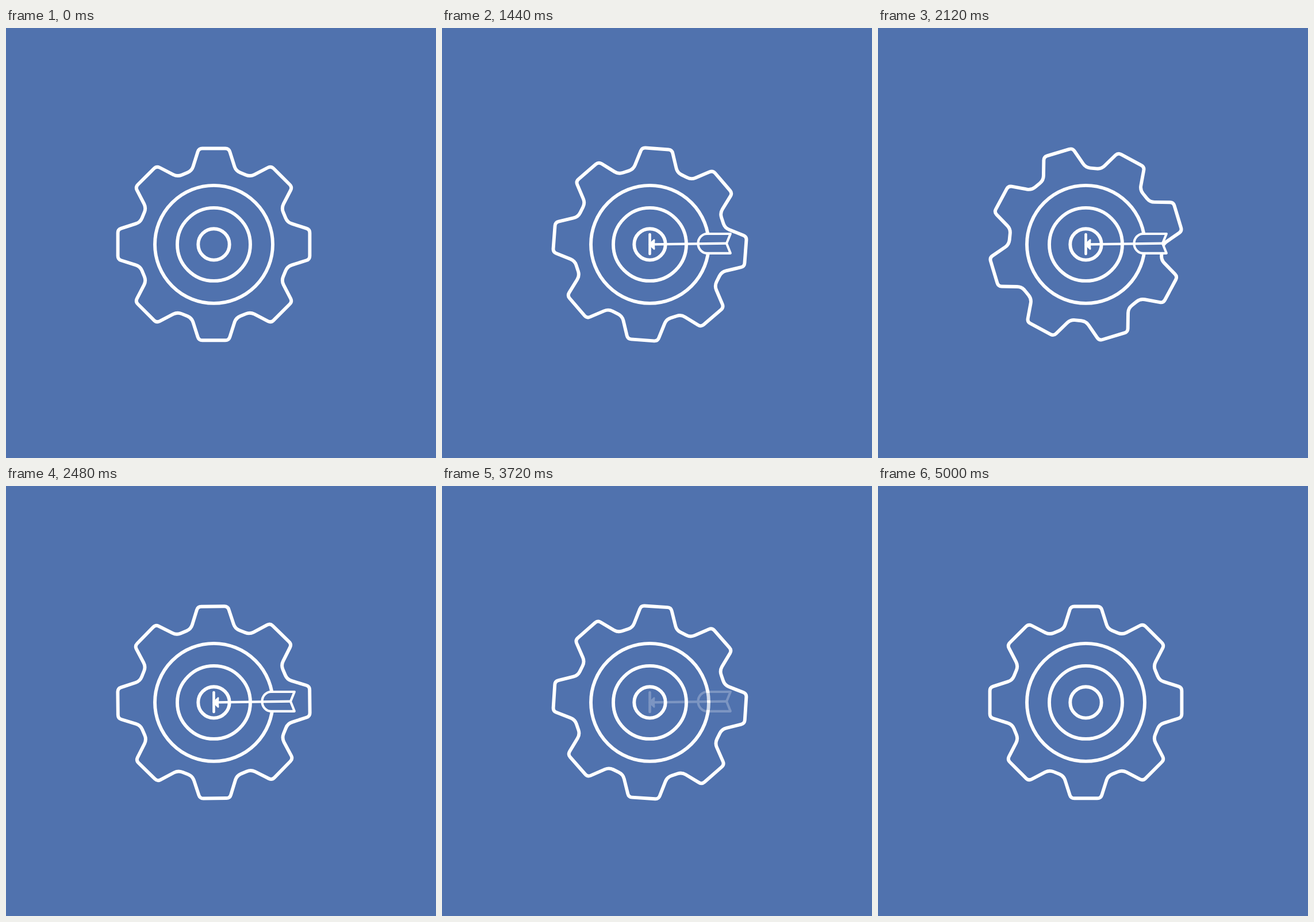
Animation of 748 by 748 pixels, one loop 5.72 s. Source, as an HTML page:

```html
<!DOCTYPE html>
<html lang="en">
<head>
<meta charset="utf-8">
<title>Arrow hits a gear</title>
<style>
  html, body { margin: 0; width: 100%; height: 100%; overflow: hidden; background: #5072ae; }
  svg { display: block; width: 100%; height: 100%; }
</style>
</head>
<body>
<svg viewBox="0 0 748 748" fill="none" stroke="#fff" stroke-width="5.9" stroke-linejoin="round">
  <g transform="translate(361.5 376.4)">
    <path id="gear"/>
    <circle r="102.5"/>
    <circle r="63.5"/>
    <circle r="27.2"/>
  </g>
  <g id="hit" stroke-width="4.2">
    <path id="mark" stroke-width="4.6" stroke-linecap="round" d="M361.5 359V393"/>
    <g id="arrow">
      <path fill="#5072ae" d="M501.8 358H461A15.5 16.9 0 0 0 461 391.8H501.8L495 374.7Z"/>
      <path d="M366 376.4L496 374.7"/>
      <path fill="#fff" stroke-width="3" d="M361 376.5L369 368.8Q368 376.5 369 384.2Z"/>
    </g>
  </g>
</svg>
<script>
const LOOP = 5720, STEP = 40;
const IMPACT = 1400, SPIN = 3600, SPEED = 0.452;
const FADE_START = 2640, FADE = 1440;
const [gear, hit, mark, arrow] = ['gear', 'hit', 'mark', 'arrow'].map(id => document.getElementById(id));

const clamp = v => Math.min(1, Math.max(0, v));

// Closed polygon with each corner [x, y, cut] rounded off.
function roundedPath(points) {
  const n = points.length;
  const toward = ([x, y, cut], [u, v]) => {
    const k = cut / Math.hypot(u - x, v - y);
    return `${x + (u - x) * k} ${y + (v - y) * k}`;
  };
  return points.map((p, i) => {
    const before = toward(p, points[(i + n - 1) % n]);
    const after = toward(p, points[(i + 1) % n]);
    return `${i ? 'L' : 'M'}${before}Q${p[0]} ${p[1]} ${after}`;
  }).join('') + 'Z';
}

function gearPoints() {
  const tooth = [[-38.4, -128, 8], [-26, -166.9, 6], [26, -166.9, 6], [38.4, -128, 8]];
  return Array.from({ length: 8 }, (_, i) => {
    const c = Math.cos(i * Math.PI / 4), s = Math.sin(i * Math.PI / 4);
    return tooth.map(([x, y, cut]) => [x * c - y * s, x * s + y * c, cut]);
  }).flat();
}

function bezierEase(x1, y1, x2, y2) {
  const curve = (a, b, u) => 3 * (1 - u) ** 2 * u * a + 3 * (1 - u) * u * u * b + u ** 3;
  return x => {
    let lo = 0, hi = 1;
    for (let i = 0; i < 30; i++) {
      const mid = (lo + hi) / 2;
      if (curve(x1, x2, mid) < x) lo = mid; else hi = mid;
    }
    return curve(y1, y2, hi);
  };
}

const spinEase = bezierEase(0.167, 0.167, 0.412, 1);
gear.setAttribute('d', roundedPath(gearPoints()));

function draw(now) {
  const t = Math.floor((now % LOOP) / STEP) * STEP;
  const away = Math.max(0, IMPACT - t) * SPEED;
  const angle = 360 * spinEase(clamp((t - IMPACT) / SPIN));
  arrow.setAttribute('transform', `translate(${away} ${-away * 0.0083})`);
  gear.setAttribute('transform', `rotate(${angle})`);
  mark.setAttribute('visibility', t < IMPACT ? 'hidden' : 'visible');
  hit.setAttribute('opacity', 1 - clamp((t - FADE_START) / FADE));
}

let start;
function frame(now) {
  start ??= now;
  draw(now - start);
  requestAnimationFrame(frame);
}
draw(0);
requestAnimationFrame(frame);
</script>
</body>
</html>
```
